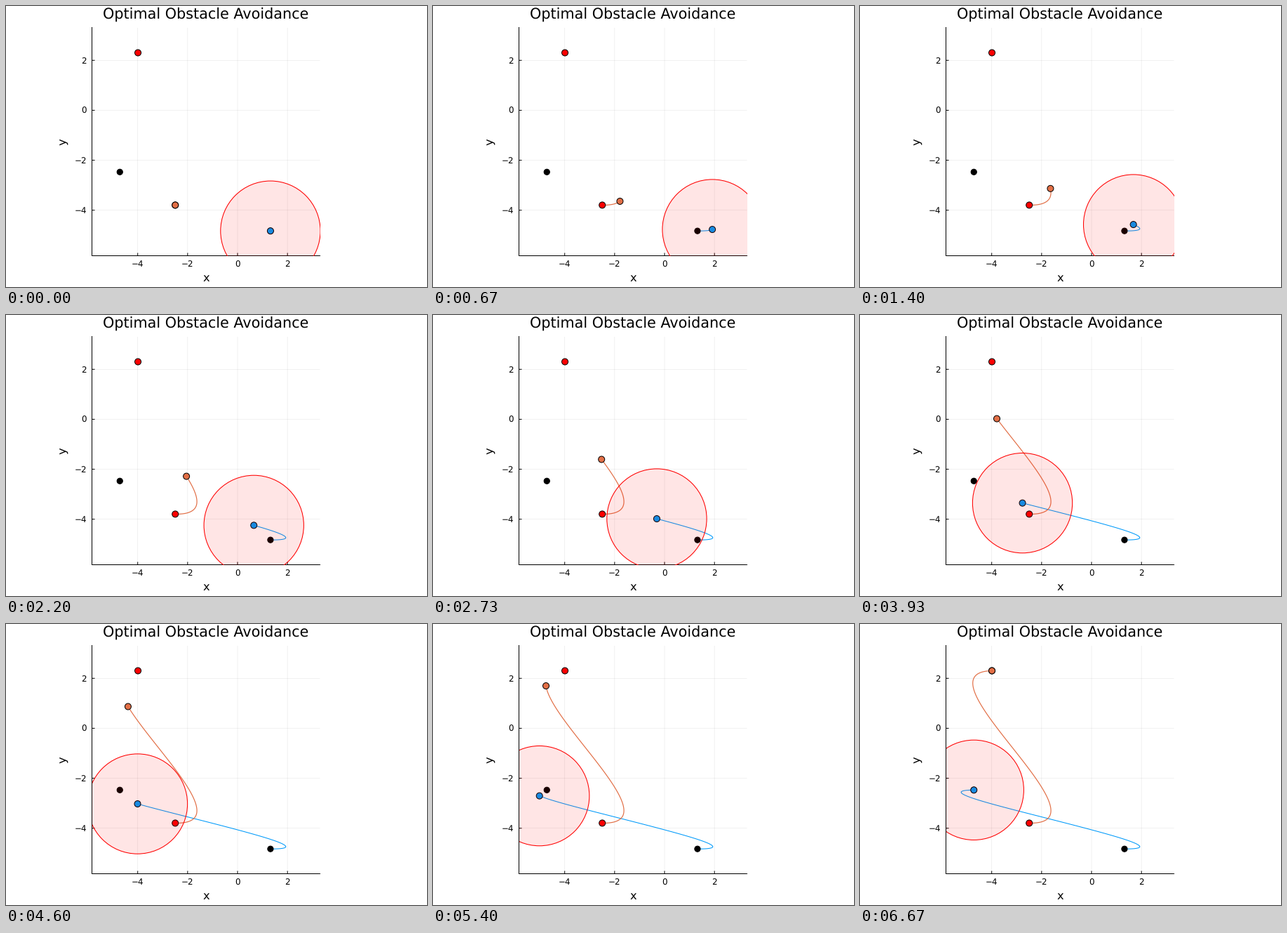
Recreate the animation shown at these times as a matplotlib script. Size 600 px wide and 400 px high, loop 6740 ms.

```python
import numpy as np
import matplotlib.pyplot as plt
from matplotlib.animation import FuncAnimation
from matplotlib.patches import Circle

W, H = 600, 400
PX = 0.72                      # points per pixel at 100 dpi
SCALE = 35.57                  # pixels per data unit
ORIGIN = (330.0, 148.45)       # pixel position of (0, 0)
LEFT, RIGHT, TOP, BOTTOM = 122.5, 447.5, 30.5, 355.5
STEPS, DT, SPEED = 100, 0.1, 1.0
LOOP, TICK, FPS = 6740, 20, 15
BLUE, ORANGE = "#009afa", "#e26f46"

plt.rcParams["font.family"] = "DejaVu Sans"
plt.rcParams["text.hinting"] = "none"

fig = plt.figure(figsize=(W / 100, H / 100), dpi=100, facecolor="white")
ax = fig.add_axes([LEFT / W, 1 - BOTTOM / H, (RIGHT - LEFT) / W, (BOTTOM - TOP) / H])
x0, x1 = (LEFT - ORIGIN[0]) / SCALE, (RIGHT - ORIGIN[0]) / SCALE
y0, y1 = (ORIGIN[1] - BOTTOM) / SCALE, (ORIGIN[1] - TOP) / SCALE
ax.set(xlim=(x0, x1), ylim=(y0, y1), xticks=[], yticks=[], autoscale_on=False)
ax.spines[["top", "right"]].set_visible(False)
for side in ("left", "bottom"):
    ax.spines[side].set(linewidth=PX, snap=False)


def label(x, y, text, size, ha="center", **kw):
    fig.text(x / W, 1 - y / H, text, fontsize=size * PX, ha=ha, va="baseline", **kw)


def rule(xs, ys, width, alpha, z):
    ax.plot(xs, ys, color="black", alpha=alpha, linewidth=width * PX, zorder=z,
            snap=False, solid_capstyle="butt")


label(285, 18.5, "Optimal Obstacle Avoidance", 20.8)
label(285, 391.6, "x", 16.3)
label(86, 193, "y", 16.3, rotation=90, rotation_mode="anchor")
tick_len = 4 / SCALE
for v in (-4, -2, 0, 2):
    name = str(v).replace("-", "\u2212")
    label(ORIGIN[0] + v * SCALE, 371.4, name, 11.9)
    label(115, ORIGIN[1] - v * SCALE + 4.4, name, 11.9, ha="right")
    rule([v, v], [y0, y1], 0.55, 0.1, 1)
    rule([x0, x1], [v, v], 0.55, 0.1, 1)
    rule([v, v], [y0, y0 + tick_len], 1, 1, 2)
    rule([x0, x0 + tick_len], [v, v], 1, 1, 2)


def trajectory(start, goal):
    """Minimum-effort double integrator with speed (1, 0) at both ends."""
    k = np.arange(STEPS + 1)
    ramp = np.concatenate([[0], np.cumsum(k * (STEPS - k))[:-1]])
    ramp = ramp / ramp[-1]
    drift = SPEED * DT * k
    x = start[0] + drift + (goal[0] - start[0] - drift[-1]) * ramp
    y = start[1] + (goal[1] - start[1]) * ramp
    return x, y


def dot(pos, color, z, radius=4.5):
    patch = Circle(pos, radius / SCALE, facecolor=color, edgecolor="black",
                   linewidth=PX, zorder=z)
    return ax.add_patch(patch)


agent_start, agent_goal = (-2.496, -3.795), (-3.991, 2.303)
obst_start, obst_goal = (1.319, -4.828), (-4.716, -2.47)

ox, oy = trajectory(agent_start, agent_goal)
bx, by = trajectory(obst_start, obst_goal)
# the obstacle yields slightly while the two pass each other
bx = bx + 0.056 * np.exp(-((np.arange(STEPS + 1) - 57) / 20) ** 2)

blue_line, = ax.plot([], [], color=BLUE, linewidth=1.05 * PX, zorder=3)
orange_line, = ax.plot([], [], color=ORANGE, linewidth=1.2 * PX, zorder=3)
for p in (agent_start, agent_goal):
    dot(p, "red", 4)
for p in (obst_start, obst_goal):
    dot(p, "black", 4, 4.1)
blue_dot = dot(obst_start, BLUE, 5)
orange_dot = dot(agent_start, ORANGE, 5)
zone = ax.add_patch(Circle(obst_start, 2, facecolor=(1, 0, 0, 0.1),
                           edgecolor="red", linewidth=1.05 * PX, zorder=6))


def draw(i):
    # 15 steps per second, evaluated just past the middle of each tick
    k = min(STEPS, int((i * TICK + 14) * FPS / 1000))
    blue_line.set_data(bx[:k + 1], by[:k + 1])
    orange_line.set_data(ox[:k + 1], oy[:k + 1])
    blue_dot.center = zone.center = (bx[k], by[k])
    orange_dot.center = (ox[k], oy[k])
    return blue_line, orange_line, blue_dot, orange_dot, zone


anim = FuncAnimation(fig, draw, frames=LOOP // TICK, interval=TICK,
                     repeat=True, repeat_delay=0, blit=False)
plt.show()
```
